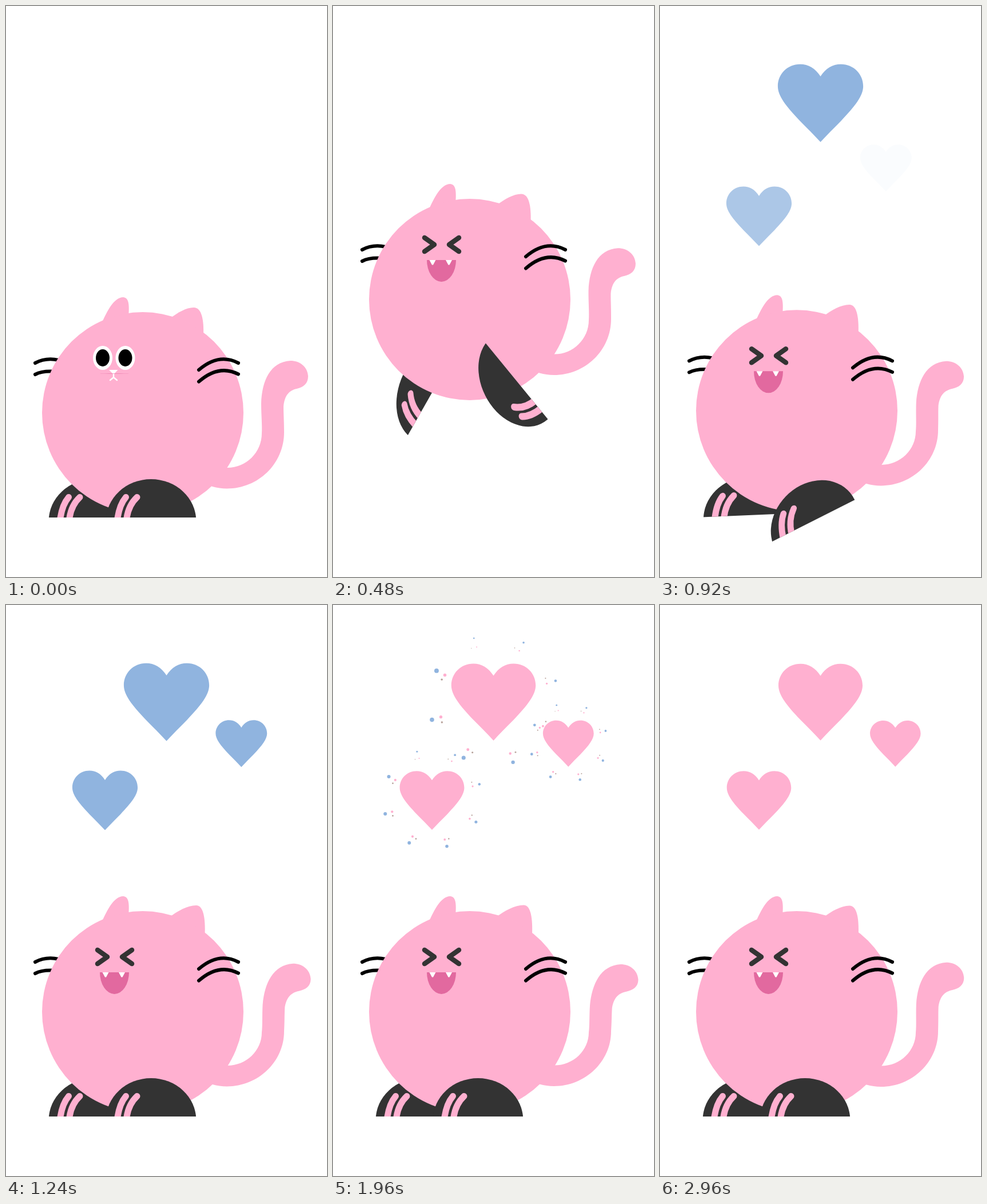
These frames come from a looping animation (561x998 px, 3 s). An HTML page with a canvas:

```html
<!DOCTYPE html>
<html lang="en">
<head>
<meta charset="utf-8">
<title>Jumping cat</title>
<style>
html, body { margin: 0; width: 100%; height: 100%; overflow: hidden; background: #fff; }
canvas { display: block; width: 561px; height: 998px; }
</style>
</head>
<body>
<canvas id="stage" width="561" height="998"></canvas>
<script>
const c = document.getElementById('stage').getContext('2d');
const LOOP = 3000, STEP = 40;
const PINK = '#ffb0d0', DARK = '#333', BLUE = '#90b4df', ROSE = '#e2699f', TAN = '#b8a39c';

const clamp = x => Math.max(0, Math.min(1, x));
const part = (t, a, b) => clamp((t - a) / (b - a));
const smooth = p => p * p * (3 - 2 * p);
const cubic = p => p < .5 ? 4 * p ** 3 : 1 - 4 * (1 - p) ** 3;
const ramp = (t, a, b) => smooth(part(t, a, b));
const rad = d => d * Math.PI / 180;

function ellipse(x, y, rx, ry, fill) {
  c.beginPath();
  c.ellipse(x, y, rx, ry, 0, 0, 2 * Math.PI);
  c.fillStyle = fill;
  c.fill();
}

function poly(points, fill) {
  c.beginPath();
  points.forEach(p => c.lineTo(...p));
  c.fillStyle = fill;
  c.fill();
}

function stroke(d, width, color) {
  c.lineWidth = width;
  c.strokeStyle = color;
  c.stroke(new Path2D(d));
}

// Half-disc foot around the middle of its flat side; it turns in a stretched space
function foot(x, px, py, angle) {
  const stretch = 1.17;
  c.save();
  c.translate(px, py);
  c.scale(1, stretch);
  c.rotate(rad(angle));
  c.scale(1, 1 / stretch);
  c.translate(x - px, 894 - py);
  c.beginPath();
  c.rect(-100, -100, 200, 100);
  c.clip();
  ellipse(0, 6, 78.8, 73, DARK);
  stroke('M-59 4Q-55.5-22-44-35.5M-43 4Q-40-21-24.5-35.5', 11, PINK);
  c.restore();
}

function tail(sway) {
  const bend = (x, y) => {
    const up = clamp((745 - y) / 90), low = clamp((y - 745) / 60);
    return [x + 5.5 * up * sway, y + (8 * up - 2.5 * low) * sway];
  };
  const curve = (...a) => c.bezierCurveTo(...bend(a[0], a[1]), ...bend(a[2], a[3]), ...bend(a[4], a[5]));
  c.beginPath();
  c.moveTo(340, 832);
  c.lineTo(...bend(361, 840));
  curve(369, 842, 377, 843.5, 386, 843.5);
  curve(441, 843.5, 486, 800, 486, 745);
  curve(486, 725, 485, 715, 485, 700);
  curve(487, 680, 495, 672, 508, 669);
  curve(520, 666, 528, 660, 528, 647);
  curve(527, 630, 513, 620, 497, 620);
  curve(462, 622, 447, 655, 446, 695);
  curve(446, 715, 448, 735, 447, 747);
  curve(447, 780, 420, 807, 387, 807);
  c.lineTo(340, 800);
  c.fillStyle = PINK;
  c.fill();
}

function ears(s) {
  c.fillStyle = PINK;
  c.fill(new Path2D('M167 555C176 535 188 509 205 509C217 510 215 528 214 548Z'));
  c.beginPath();
  c.moveTo(288 - 2 * s, 545);
  c.bezierCurveTo(300 - s, 536 - s, 315 + 3 * s, 527 - 2.5 * s, 328 + 5 * s, 527 - 2.5 * s);
  c.bezierCurveTo(342 + 4 * s, 527 - 2.5 * s, 346 + 3 * s, 548, 345 + 3 * s, 576);
  c.fill();
}

function face(t) {
  const open = smooth(part(t, 0, 200));
  if (t < 80) {
    for (const x of [169, 208.5]) {
      ellipse(x, 615, 17, 21, '#fff');
      ellipse(x, 615, 12, 15, '#000');
    }
    poly([[180, 636], [195.5, 636], [188, 644]], '#fff');
    stroke('M188 642V649M182 654L188 649L194 654', 2.4, '#fff');
  } else {
    stroke('M160 603L177 615L160 627M220 603L203 615L220 627', 8.5, DARK);
  }
  c.save();
  c.translate(0, 642);
  c.scale(1, Math.max(open, .012));
  c.beginPath();
  c.ellipse(189.5, 0, 25.5, 38, 0, 0, Math.PI);
  c.fillStyle = ROSE;
  c.fill();
  if (open > .1) {
    for (const x of [174, 202.5]) poly([[x - 5.5, 0], [x + 5.5, 0], [x + 1, 8.5], [x - 1, 8.5]], '#fff');
  }
  c.restore();
}

function cat(t) {
  const lift = cubic(part(t, 0, 200)) - cubic(part(t, 720, 960));
  const front = -149.3 * (ramp(t, 160, 560) - ramp(t, 770, 970));
  const back = -56.4 * (ramp(t, 160, 448) - ramp(t, 780, 938));
  const sway = ramp(t, 80, 1640) - ramp(t, 2350, 3750);
  c.save();
  c.translate(0, -198 * lift);
  c.lineCap = c.lineJoin = 'round';
  stroke('M51 624Q70 614 92 619M51 644Q64 637 88 639', 6, '#000');
  foot(153.5, 146, 860, back);
  tail(sway);
  ears(sway);
  ellipse(239, 711, 176, 176, PINK);
  stroke('M337 636Q372 606 406 624M337 656.5Q372 626 406 643.5', 6, '#000');
  face(t);
  foot(253.5, 280, 857, front);
  c.restore();
}

const HEART = new Path2D('M0-46C-9-60-21-67-35-67C-57-67-73.5-50-73.5-29C-73.5-13-60 5-35 31' +
  'C-23 43-11 55 0 67C11 55 23 43 35 31C60 5 73.5-13 73.5-29C73.5-50 57-67 35-67C21-67 9-60 0-46Z');

// Eight clusters of dots fly out one after another
function burst(t) {
  const dist = (far, age) => far * (1 - Math.exp(-age / 114));
  for (let i = 0; i < 8; i++) {
    const age = t - i * 40;
    if (age <= 0) continue;
    const grow = (.4 + .6 * dist(1, age)) * (1 - ramp(age, 450, 950));
    const a = rad(-107.5 + 45 * i);
    const dot = (turn, d, r, color) =>
      ellipse(d * Math.cos(a + turn), d * Math.sin(a + turn) - 3, r * grow, r * grow, color);
    if (grow <= 0) continue;
    dot(0, dist(114, age), 4, BLUE);
    dot(0, dist(98, Math.max(0, age - 42)), 2.8, PINK);
    dot(-.096, dist(99, age), 1.8, TAN);
  }
}

function heart(t, h) {
  const come = ramp(t, h.start, h.start + 160);
  if (come <= 0) return;
  const away = 1 - come;
  const swell = 1 + .015 * (1 - ramp(t, 1400, 2200));
  c.save();
  c.translate(h.x + h.dx * away, h.y + h.dy * away);
  c.scale(h.size, h.size);
  c.globalAlpha = clamp(come * 1.5);
  if (t > h.pop) burst(t - h.pop);
  c.scale(swell, swell);
  c.fillStyle = BLUE;
  const fill = ramp(t, h.pop + 40, h.pop + 440);
  if (fill < .9) c.fill(HEART);
  if (fill > 0) {
    c.save();
    c.clip(HEART);
    ellipse(0, 0, 108 * fill, 108 * fill, PINK);
    c.restore();
  }
  c.restore();
}

const hearts = [
  { x: 280.5, y: 169.7, size: 1, start: 760, pop: 1205, dx: 0, dy: 50 },
  { x: 173, y: 341.6, size: .765, start: 840, pop: 1257, dx: 0, dy: 52 },
  { x: 411.3, y: 242.3, size: .602, start: 904, pop: 1285, dx: -17, dy: 42 }
];

function frame() {
  const t = Math.floor(performance.now() % LOOP / STEP) * STEP;
  c.fillStyle = '#fff';
  c.fillRect(0, 0, 561, 998);
  hearts.forEach(h => heart(t, h));
  cat(t);
  requestAnimationFrame(frame);
}
frame();
</script>
</body>
</html>
```
